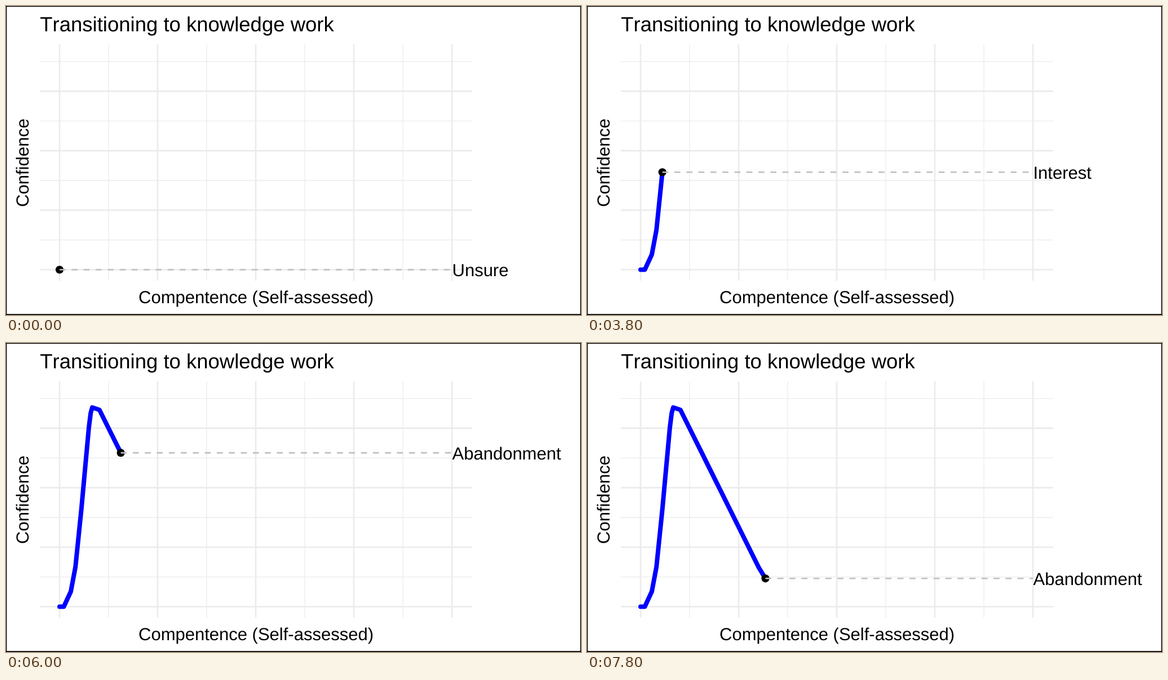
An HTML page that plays this animation: 1020x549 px, repeating every 8 s.

```html
<!DOCTYPE html>
<html lang="en">
<head>
<meta charset="utf-8">
<title>Transitioning to knowledge work</title>
<style>
  html, body { margin: 0; width: 100%; height: 100%; overflow: hidden; background: #fff; }
  svg { display: block; width: 100%; height: 100%; }
  text {
    font: 31px "Liberation Sans", Arial, sans-serif;
    font-kerning: none;
    font-variant-ligatures: none;
    text-rendering: geometricPrecision;
  }
  #title { font-size: 36.5px; }
  .mid { text-anchor: middle; }
  path, polyline { fill: none; }
  .grid { stroke: #ebebeb; }
</style>
</head>
<body>
<svg viewBox="0 0 1020 549">
  <path id="minor" class="grid" stroke-width="1.3"/>
  <path id="major" class="grid" stroke-width="2.6"/>
  <text id="title" x="60.3" y="45">Transitioning to knowledge work</text>
  <text class="mid" x="443.5" y="528">Compentence (Self-assessed)</text>
  <text class="mid" transform="translate(39.5 278.5) rotate(-90)">Confidence</text>
  <polyline id="trail" stroke="#00f" stroke-width="8" stroke-linecap="round" stroke-linejoin="round"/>
  <circle id="dot" r="7.1"/>
  <path id="guide" stroke="#bebebe" stroke-width="2.6" stroke-dasharray="10.65"/>
  <text id="label" x="791.5"></text>
  <rect x="0" y="0" width="1020" height="548.6" fill="none" stroke="#000" stroke-width="2.7"/>
</svg>
<script>
  const $ = id => document.getElementById(id);
  const LOOP = 8000, RIGHT = 791;

  const columns = first => [0, 1, 2, 3].map(i => `M${first + 174 * i} 68V488`).join("");
  const rows = first => [0, 1, 2, 3].map(i => `M60 ${first - 105.7 * i}H827`).join("");
  $("minor").setAttribute("d", columns(182) + rows(415.7));
  $("major").setAttribute("d", columns(95) + `M${RIGHT} 68V488` + rows(468.5));

  // Each step: start time, x, y, label
  const steps = [
    [0, 95, 468.5, "Unsure"],
    [1200, 102.5, 468.5, "Unsure"],
    [2400, 115, 441.5, "Unsure"],
    [2600, 123.2, 397.7, "Interest"],
    [3800, 133.7, 295.3, "Interest"],
    [4000, 147, 150, "Interest"],
    [4200, 150.3, 124, "Discovery"],
    [5200, 153, 114.5, "Abandonment"]
  ];
  // Steady descent
  for (let i = 0; i < 12; i++)
    steps.push([5400 + 200 * i, 165.7 + 12.64 * i, 118.7 + 25.48 * i, "Abandonment"]);
  steps.push([7800, 316.5, 418.3, "Abandonment"]);

  function draw(time) {
    const seen = steps.filter(step => step[0] <= time);
    const [, x, y, name] = seen[seen.length - 1];
    $("trail").setAttribute("points", seen.length > 1 ? seen.map(s => s[1] + "," + s[2]).join(" ") : "");
    $("dot").setAttribute("cx", x);
    $("dot").setAttribute("cy", y);
    $("guide").setAttribute("d", `M${x} ${y}H${RIGHT}`);
    $("label").setAttribute("y", y + 11.7);
    $("label").textContent = name;
  }

  const start = performance.now();
  function tick() {
    draw((performance.now() - start) % LOOP);
    requestAnimationFrame(tick);
  }
  tick();
</script>
</body>
</html>
```
